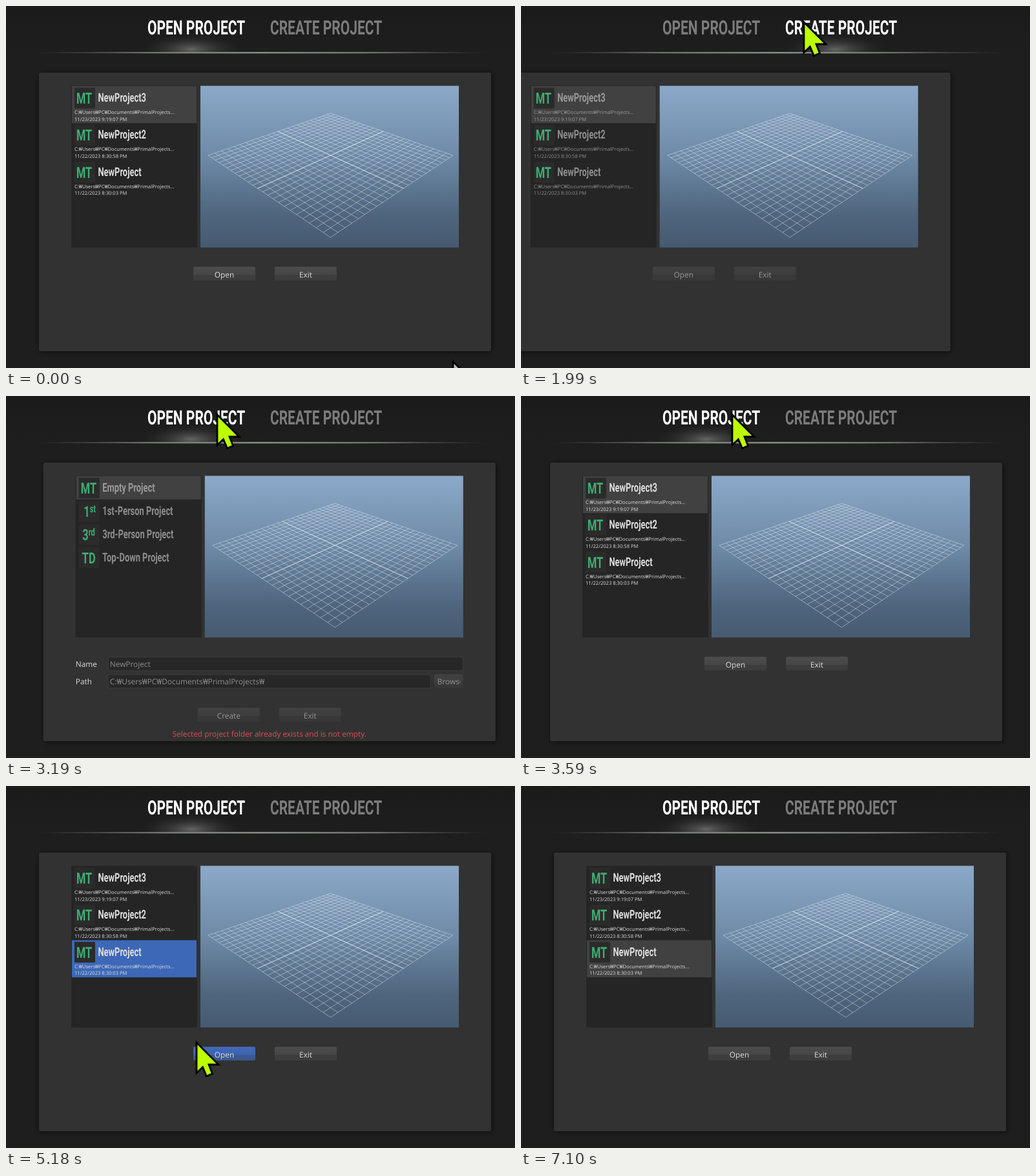
Write an HTML page that moves like this. It is 788x560 px and loops after 7200 ms.

```html
<!DOCTYPE html>
<html lang="en">
<head>
<meta charset="utf-8">
<title>Project browser</title>
<style>
  html, body { margin: 0; width: 100%; height: 100%; overflow: hidden; background: #1e1e1e; }
  svg { display: block; width: 788px; height: 560px; }
  text { font-family: "Open Sans", "Noto Sans", "Noto Sans CJK KR", sans-serif; font-size: 11.85px; fill: #dcdcdc; text-rendering: geometricPrecision; white-space: pre; }
  .din { font-family: Roboto, "Liberation Sans", sans-serif; font-weight: 700; }
  .tab { font-weight: 600; }
  .icon { fill: #3dae74; }
  .small { font-size: 7.6px; }
  .mid { text-anchor: middle; }
  .error { fill: #e8505e; }
  .off .soft { opacity: .57; }
  .off .error { opacity: .92; }
</style>
</head>
<body>
<svg id="stage" viewBox="0 0 788 560"></svg>
<script>
const LOOP = 7200;
const PAGE = 1600;
const CONDENSED = 0.69;
const stage = document.getElementById('stage');

const rect = (x, y, w, h, fill, more = '') =>
  `<rect x="${x}" y="${y}" width="${w}" height="${h}" fill="${fill}" ${more}/>`;
const text = (x, y, str, cls = '') => `<text x="${x}" y="${y}" class="${cls}">${str}</text>`;
const din = (x, y, size, str, cls = '') =>
  `<text class="din ${cls}" style="font-size:${size}px" transform="translate(${x} ${y}) scale(${CONDENSED} 1)">${str}</text>`;

const stops = list => list.map(([offset, color, alpha = 1]) =>
  `<stop offset="${offset}" stop-color="${color}" stop-opacity="${alpha}"/>`).join('');
const vertical = (id, list) =>
  `<linearGradient id="${id}" x2="0" y2="1">${stops(list)}</linearGradient>`;

const defs = `<defs>
  ${vertical('sky', [[0, '#8ca9c9'], [.45, '#6d89a6'], [.8, '#4e657d'], [1, '#465b71']])}
  ${vertical('button', [[0, '#525252'], [.08, '#4b4b4b'], [.6, '#464646'], [.6, '#3d3d3d'], [1, '#3d3d3d']])}
  ${vertical('blueButton', [[0, '#4a70bd'], [.08, '#4068b8'], [.6, '#3d63b0'], [.6, '#3b598f'], [1, '#3b598f']])}
  ${vertical('shade', [[0, '#1b1b1b'], [1, '#1e1e1e']])}
  <linearGradient id="rule">${stops([[0, '#8d938c', 0], [.25, '#8d938c', .7], [.5, '#939992', .9], [.75, '#8d938c', .7], [1, '#8d938c', 0]])}</linearGradient>
  <radialGradient id="glow">${stops([[0, '#848484', .7], [.25, '#707070', .5], [.6, '#555', .25], [1, '#333', 0]])}</radialGradient>
  <clipPath id="aboveRule"><rect width="788" height="72"/></clipPath>
  <clipPath id="browse"><rect x="656" y="430" width="40.5" height="22"/></clipPath>
  <filter id="shadow" x="-5%" y="-5%" width="110%" height="112%">
    <feDropShadow dx="1" dy="1" stdDeviation="4" flood-color="#000" flood-opacity=".6"/>
  </filter>
</defs>`;

// Ground plane: u runs across the picture, v runs towards the viewer.
function project(u, v) {
  const w = 1 / (1 - 0.323 * v);
  return `${(502.5 + 189.5 * u * w).toFixed(2)} ${(-35 + 266 * w).toFixed(2)}`;
}
function gridLines(values) {
  const ground = (a, b) => project((a - b) / 2, (a + b) / 2);
  return values.map(s =>
    `M${ground(s, -1)}L${ground(s, 1)}M${ground(-1, s)}L${ground(1, s)}`).join('');
}
const grid = gridLines(Array.from({ length: 25 }, (_, i) => i / 12 - 1));
const preview = rect(301, 123.5, 400, 250, 'url(#sky)') +
  `<path d="${grid}" fill="none" stroke="#e4eaf0" stroke-opacity=".45"/>
   <path d="${gridLines([0])}" fill="none" stroke="#f0f4f8" stroke-opacity=".5" stroke-width="1.2"/>`;

const button = (x, y, w, label, id = '', cls = '') =>
  `<g class="${cls}">${rect(x, y, w, 21, 'url(#button)', `rx="2" class="soft" id="${id}"`)}
   ${text(x + w / 2, y + 16, label, 'mid soft')}</g>`;
const field = (y, w, value) =>
  rect(151.5, y, w, 21, '#272727', 'stroke="#3c3c3c"') + text(154, y + 15, value, 'soft');
const iconBox = y => rect(106, y, 32, 32, '#2b2b2b');

const panel = rect(51, 103, 700, 431, '#303030', 'rx="3" filter="url(#shadow)"') +
  rect(101, 123.5, 195, 250, '#252525');

const recent = [
  ['NewProject3', '11/23/2023 9:19:07 PM'],
  ['NewProject2', '11/22/2023 8:30:58 PM'],
  ['NewProject', '11/22/2023 8:30:03 PM']
].map(([name, date], i) => {
  const y = 124 + i * 57.3;
  return rect(102, y, 193, 57.3, 'none', `id="row${i}"`) + iconBox(y + 2.5) +
    din(109, y + 27, 23.7, 'MT', 'icon') +
    din(142.5, y + 24, 18.7, name, 'soft') +
    text(106, y + 43, 'C:₩Users₩PC₩Documents₩PrimalProjects...', 'small soft') +
    text(106, y + 53.5, date, 'small soft');
}).join('');

const raised = str => `<tspan dy="-7" style="font-size:16px">${str}</tspan>`;
const templates = [
  ['Empty', 'MT', 109],
  ['1st-Person', '1' + raised('st'), 113.5],
  ['3rd-Person', '3' + raised('rd'), 111.5],
  ['Top-Down', 'TD', 111]
].map(([name, icon, x], i) => {
  const y = 124 + i * 36;
  return (i ? '' : rect(102, y, 193, 36, '#414141')) + iconBox(y + 2.5) +
    din(x, y + 27, 23.7, icon, 'icon') +
    din(142.5, y + 24, 18.7, name + ' Project', 'soft');
}).join('');

stage.innerHTML = defs + rect(0, 0, 788, 560, '#1e1e1e') +
  rect(0, 0, 788, 72, 'url(#shade)') +
  din(219, 44, 30.4, 'OPEN PROJECT', 'tab') + din(409, 44, 30.4, 'CREATE PROJECT', 'tab') +
  `<g clip-path="url(#aboveRule)"><ellipse id="light" cx="287" cy="67" rx="77" ry="23" fill="url(#glow)"/></g>
  <ellipse cx="396" cy="72.2" rx="355" ry="1.3" fill="url(#rule)"/>
  <g id="openPage">${panel}${recent}${preview}
    ${button(290, 403.5, 96, 'Open', 'openButton')}${button(416, 403.5, 96, 'Exit')}</g>
  <g id="createPage">${panel}${templates}${preview}
    ${text(101, 419, 'Name')}${text(101, 446, 'Path')}
    ${field(404, 549, 'NewProject')}${field(431, 499, 'C:₩Users₩PC₩Documents₩PrimalProjects₩')}
    ${rect(656, 430.5, 45, 21, 'url(#button)', 'rx="2" class="soft"')}
    <g clip-path="url(#browse)">${text(661, 446, 'Browse', 'soft')}</g>
    ${button(290, 482.5, 96, 'Create', '', 'off')}${button(416, 482.5, 96, 'Exit')}
    ${text(401, 527, 'Selected project folder already exists and is not empty.', 'mid error')}</g>
  <path id="cursor" d="M3 3V50L12.5 41L18.5 55L27.5 51L22 37H37Z" stroke="#000" stroke-width="2.8"/>`;

const $ = id => document.getElementById(id);
const parts = Object.fromEntries(
  ['light', 'openPage', 'createPage', 'openButton', 'row0', 'row1', 'row2', 'cursor'].map(id => [id, $(id)]));
const [openTab, createTab] = stage.querySelectorAll('.tab');

// Pointer path: time, x, y
const path = [
  [0, 689, 547], [790, 548, 470], [1390, 435, 22], [1990, 435, 22], [2390, 424, 22],
  [2790, 324, 26], [3890, 324, 26], [4290, 190, 223], [4390, 190, 223], [4580, 184, 250],
  [4680, 184, 250], [5180, 292, 394], [5480, 333, 419], [5580, 333, 419],
  [5780, 301, 376], [6400, 558, 515]
];
const clamp = p => Math.min(1, Math.max(0, p));
const smooth = p => p * p * (3 - 2 * p);
const cubic = p => p < .5 ? 4 * p ** 3 : 1 - 4 * (1 - p) ** 3;
const tween = (t, start, length) => cubic(clamp((t - start) / length));

function pointerAt(t) {
  const i = Math.max(1, path.findIndex(key => key[0] >= t));
  const [t0, x0, y0] = path[i - 1], [t1, x1, y1] = path[i];
  const p = smooth(clamp((t - t0) / (t1 - t0)));
  return [x0 + (x1 - x0) * p, y0 + (y1 - y0) * p];
}

// The light moves first, then the pages slide.
const toCreate = 1672, toOpen = 2940;
const LIGHT_TIME = 200, SLIDE_TIME = 500;

function draw(t) {
  const between = (a, b) => t >= a && t < b;
  const creating = between(1590, 2990);
  const focused = between(4580, 7100);
  const selected = t < 4580 ? 0 : 2;

  openTab.style.fill = !creating || t >= 2690 ? '#fff' : '#7c7c7c';
  createTab.style.fill = between(1290, 2990) ? '#fff' : '#7c7c7c';
  const progress = (delay, length) =>
    tween(t, toCreate + delay, length) - tween(t, toOpen + delay, length);
  parts.light.setAttribute('cx', 287 + 200 * progress(0, LIGHT_TIME));

  const shift = -PAGE * progress(LIGHT_TIME, SLIDE_TIME);
  parts.openPage.setAttribute('transform', `translate(${shift})`);
  parts.createPage.setAttribute('transform', `translate(${shift + PAGE})`);
  parts.openPage.classList.toggle('off', creating);
  parts.createPage.classList.toggle('off', !creating);

  for (let i = 0; i < 3; i++) {
    const hovered = i === 1 && between(4190, 4480);
    const fill = i === selected ? (focused ? '#3d68b8' : '#414141') : hovered ? '#363636' : 'none';
    parts['row' + i].setAttribute('fill', fill);
  }
  parts.openButton.setAttribute('fill', focused ? 'url(#blueButton)' : 'url(#button)');

  const visible = t < 6500;
  parts.cursor.style.display = visible ? '' : 'none';
  if (visible) {
    const [x, y] = pointerAt(Math.min(t, 6400));
    parts.cursor.setAttribute('transform', `translate(${x} ${y})`);
    parts.cursor.setAttribute('fill', t < 100 ? '#b9b9b0' : '#bcff00');
  }
}

const start = performance.now();
function tick() {
  draw((performance.now() - start) % LOOP);
  requestAnimationFrame(tick);
}
tick();
</script>
</body>
</html>
```
